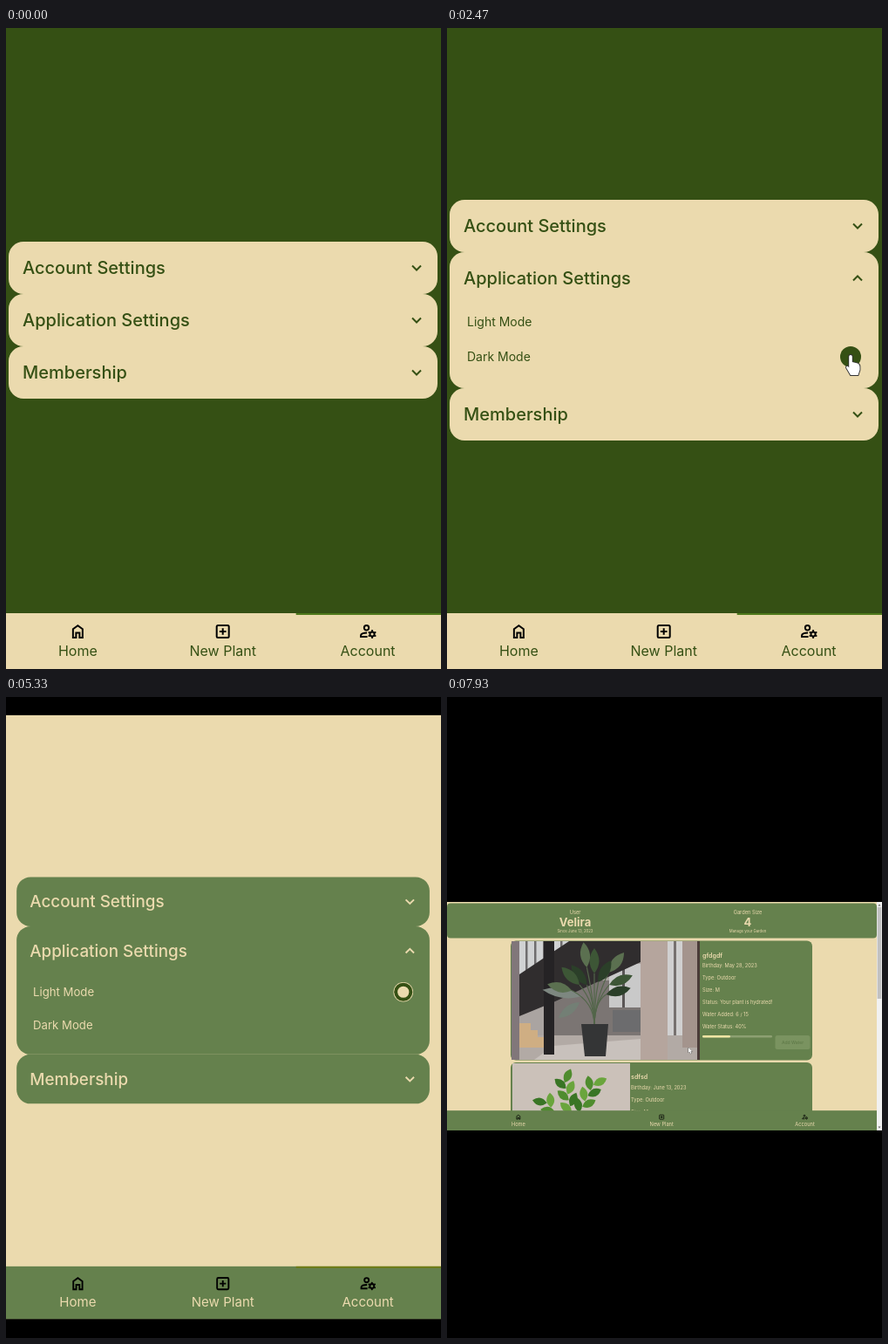
Recreate the animation shown at these times as an HTML page with a canvas. Size 499 by 735 pixels, loop 8000 ms.

```html
<!DOCTYPE html>
<html lang="en">
<head>
<meta charset="utf-8">
<title>Plant care app</title>
<style>
html, body { margin: 0; width: 100%; height: 100%; overflow: hidden; background: #000; }
canvas { display: block; width: 499px; height: 735px; }
</style>
</head>
<body>
<canvas id="stage" width="499" height="735"></canvas>
<script>
const LOOP = 8000, STEP = 130, STAGE_W = 499, STAGE_H = 735, WIDE = 1400;
const BEIGE = '#ebdaae', DARK = '#355014', GREEN = '#65814d';
const themes = {
  dark: { page: DARK, card: BEIGE, ink: DARK, line: '#4f7a1c' },
  light: { page: BEIGE, card: GREEN, ink: BEIGE, line: '#6f7a12' }
};
const SWITCH_DARK = 2470, SWITCH_LIGHT = 4160, HOME_AT = 6890, PHOTOS_AT = 7540;

const ctx = document.getElementById('stage').getContext('2d');

const clamp = v => Math.max(0, Math.min(1, v));
const easeOut = v => 1 - (1 - v) ** 2;
const easeInOut = v => v < .5 ? 2 * v * v : 1 - 2 * (1 - v) ** 2;
const mix = (a, b, k) => a + (b - a) * k;
const tween = (t, start, span) => easeOut(clamp((t - start) / span));

function rect(x, y, w, h, color) {
  ctx.fillStyle = color;
  ctx.fillRect(x, y, w, h);
}

function box(x, y, w, h, r, color) {
  ctx.beginPath();
  ctx.roundRect(x, y, w, h, r);
  ctx.fillStyle = color;
  ctx.fill();
}

function disc(x, y, r, color) {
  ctx.beginPath();
  ctx.arc(x, y, r, 0, Math.PI * 2);
  ctx.fillStyle = color;
  ctx.fill();
}

function poly(color, ...p) {
  ctx.beginPath();
  for (let i = 0; i < p.length; i += 2) ctx.lineTo(p[i], p[i + 1]);
  ctx.fillStyle = color;
  ctx.fill();
}

function text(str, x, y, size, weight, color, align = 'left') {
  ctx.font = `${weight} ${size}px Inter, sans-serif`;
  ctx.textAlign = align;
  ctx.fillStyle = color;
  ctx.fillText(str, x, y);
}

function at(x, y, draw) {
  ctx.save();
  ctx.translate(x, y);
  draw();
  ctx.restore();
}

// Navigation bar

const housePath = new Path2D('M-5.5 7V-2.8L0-6.8 5.5-2.8V7H2V1.5H-2V7Z');
const plusPath = new Path2D('M-3.8 0H3.8M0-3.8V3.8');
const personPath = new Path2D('M-.5 6H-8V4.2Q-7.4 1.4-1 1.4M1.2-4.2a2.7 2.7 0 1 1-5.4 0a2.7 2.7 0 1 1 5.4 0');

const icons = [
  () => ctx.stroke(housePath),
  () => {
    ctx.beginPath();
    ctx.roundRect(-7, -7, 14, 14, 1.5);
    ctx.stroke();
    ctx.stroke(plusPath);
  },
  () => {
    ctx.stroke(personPath);
    ctx.beginPath();
    ctx.arc(5, 3, 2.6, 0, Math.PI * 2);
    ctx.stroke();
    for (let i = 0; i < 6; i++) {
      const a = i * Math.PI / 3 + Math.PI / 6;
      disc(5 + 4 * Math.cos(a), 3 + 4 * Math.sin(a), 1.1, '#000');
    }
  }
];

function drawNav(width, theme, active) {
  rect(0, 671, width, 64, theme.card);
  if (active >= 0) rect(width * active / 3, 671, width / 3, 2, theme.line);
  ['Home', 'New Plant', 'Account'].forEach((label, i) => {
    const x = width * (i + .5) / 3 - .8;
    ctx.strokeStyle = '#000';
    ctx.lineWidth = 2;
    at(x, 692, icons[i]);
    text(label, x, 720, 16, 400, theme.ink, 'center');
  });
}

// Account page

function drawChevron(x, y, open, color) {
  at(x, y + 5 * Math.sin(Math.PI * open), () => {
    ctx.rotate(Math.PI * open);
    ctx.beginPath();
    ctx.moveTo(-5, -2.5);
    ctx.lineTo(0, 2.5);
    ctx.lineTo(5, -2.5);
    ctx.strokeStyle = color;
    ctx.lineWidth = 2;
    ctx.stroke();
  });
}

function drawRadio(x, y, light) {
  if (!light) return disc(x, y, 12, DARK);
  disc(x, y, 12, BEIGE);
  disc(x, y, 11.2, DARK);
  disc(x, y, 7, BEIGE);
}

function drawAccount(t, width) {
  const light = t >= SWITCH_LIGHT;
  const theme = light ? themes.light : themes.dark;
  const w = Math.min(width - 7, 503), x = (width - w) / 2 - .5;
  const appOpen = tween(t, 1424, 240);
  const panels = [
    ['Account Settings', 112 * (tween(t, 640, 210) - tween(t, 1424, 210)),
      tween(t, 640, 280) - tween(t, 1424, 280)],
    ['Application Settings', 96 * appOpen, tween(t, 1424, 280)],
    ['Membership', 0, 0]
  ];
  let y = 335 - panels.reduce((sum, p) => sum + 60 + p[1], 0) / 2;

  rect(0, 0, width, STAGE_H, theme.page);
  panels.forEach(([title, extra, turn], i) => {
    const h = 60 + extra;
    ctx.save();
    box(x, y, w, h, 17, theme.card);
    ctx.clip();
    text(title, x + 16, y + 37, 20, 500, theme.ink);
    drawChevron(x + w - 24, y + 30, turn, theme.ink);
    if (i === 1 && extra > 0) {
      const row = y + 80 + 53 * (1 - appOpen);
      const picked = t >= SWITCH_DARK && !light ? 1 : 0;
      text('Light Mode', x + 20, row + 5, 14, 400, theme.ink);
      text('Dark Mode', x + 20, row + 45, 14, 400, theme.ink);
      drawRadio(x + w - 32, row + 40 * picked, light);
    }
    ctx.restore();
    y += h;
  });
  drawNav(width, theme, 2);
}

// Home page, laid out in stage pixels

function leaf(x, y, len, angle, w, color) {
  at(x, y, () => {
    ctx.rotate(angle);
    ctx.beginPath();
    ctx.moveTo(0, 0);
    ctx.quadraticCurveTo(len * .5, -w, len, 0);
    ctx.quadraticCurveTo(len * .5, w, 0, 0);
    ctx.fillStyle = color;
    ctx.fill();
  });
}

function drawLoft() {
  ctx.save();
  ctx.beginPath();
  ctx.rect(74, 280, 216, 136);
  ctx.clip();
  rect(74, 280, 216, 136, '#aaa4a1');
  rect(83, 280, 60, 50, '#d0d2d3');
  for (let x = 90; x < 145; x += 10) rect(x, 280, 2.5, 50, '#6f6d6e');
  rect(122, 325, 100, 66, '#7b7573');
  rect(186, 306, 36, 50, '#c9c9c9');
  rect(201, 306, 3, 50, '#5a5656');
  poly('#302d2e', 83, 318, 140, 280, 222, 280, 222, 304, 122, 350, 83, 366);
  rect(74, 388, 216, 28, '#b2aaa5');
  poly('#c8c1bc', 122, 400, 222, 392, 222, 416, 100, 416);
  poly('#cfae83', 83, 374, 96, 374, 96, 382, 104, 382, 104, 390, 111, 390, 111, 402, 83, 402);
  rect(190, 359, 32, 25, '#6c6c6e');
  rect(74, 280, 9, 136, '#81777a');
  rect(111, 280, 12, 130, '#252325');
  rect(222, 280, 31, 136, '#b5a59d');
  rect(253, 280, 17, 108, '#d0d0d0');
  rect(260, 280, 3, 108, '#77716f');
  rect(270, 280, 17, 122, '#a4948d');
  rect(287, 280, 3, 136, '#4a3b38');
  leaf(155, 343, 46, 3.3, 11, '#7d8780');
  leaf(152, 350, 30, 2.5, 10, '#737f75');
  for (let i = 0; i < 9; i++) {
    const a = -Math.PI * (.08 + .84 * i / 8);
    const reach = 20 + 9 * (i % 3);
    const x = 169 + reach * .7 * Math.cos(a), y = 346 + reach * Math.sin(a);
    ctx.beginPath();
    ctx.moveTo(169, 377);
    ctx.quadraticCurveTo(169, 350, x, y);
    ctx.strokeStyle = '#53664a';
    ctx.lineWidth = 1.2;
    ctx.stroke();
    leaf(x, y, 29, a + .2 * (i % 2), 11, ['#2b3f29', '#3d5636', '#5b7050'][i % 3]);
  }
  poly('#343536', 154, 375, 185, 375, 182, 412, 158, 412);
  ctx.restore();
}

function drawSprout() {
  ctx.save();
  ctx.beginPath();
  ctx.rect(75, 420, 135, 55);
  ctx.clip();
  rect(75, 420, 135, 55, '#cbc1b9');
  [[124, -2.3, 3], [143, -1.8, 6], [152, -1.1, 6]].forEach(([x, lean, pairs], i) => {
    for (let k = 0; k < pairs; k++) {
      const up = k * 7, side = k % 2 ? 1 : -1;
      leaf(x + Math.cos(lean) * up, 476 + Math.sin(lean) * up, 17,
        lean + side * .65, 9, ['#4f8c2e', '#6aa53c', '#397525'][(k + i) % 3]);
    }
  });
  ctx.restore();
}

function drawFacts(x, y, gap, title, facts) {
  text(title, x, y + 2.5, 7.1, 600, BEIGE);
  facts.forEach((fact, i) => text(fact, x, y + 14 + gap * i, 5.7, 400, BEIGE));
}

const firstFacts = ['Birthday: May 28, 2023', 'Type: Outdoor', 'Size: M',
  'Status: Your plant is hydrated!', 'Water Added: 6 / 15', 'Water Status: 40%'];
const secondFacts = ['Birthday: June 13, 2023', 'Type: Outdoor', 'Size: M',
  'Status: Your plant is hydrated!'];

function drawWater(x, y) {
  box(x, y, 80, 2.6, 1.3, '#8da072');
  box(x, y, 32, 2.6, 1.3, '#f0e5a4');
  box(x + 83.5, y, 40, 16, 2.5, '#7a9360');
  text('Add Water', x + 103.5, y + 10, 5, 500, '#5f7a48', 'center');
}

function drawHome(photos) {
  const lift = photos ? 1 : 0;
  rect(0, 235, STAGE_W, 262, BEIGE);
  box(0, 237.5 - lift, 493, 40, 4, GREEN);
  [[147, 'User', 'Velira', 'Since June 13, 2023'],
   [345, 'Garden Size', '4', 'Manage your Garden']].forEach(([x, top, big, low]) => {
    text(top, x, 250 - lift, 5.7, 400, BEIGE, 'center');
    text(big, x, 264 - lift, 13, 700, BEIGE, 'center');
    text(low, x, 270.7 - lift, 4.28, 400, BEIGE, 'center');
  });
  if (photos) {
    box(73, 279.5, 346, 137, 6, GREEN);
    drawLoft();
    drawFacts(293, 296, 14, 'gfdgdf', firstFacts);
    drawWater(293, 388);
    box(73, 419, 346, 70, 6, GREEN);
    drawSprout();
    drawFacts(211, 435.5, 14, 'sdfsd', secondFacts);
  } else {
    box(183, 281, 126.5, 121, 5, GREEN);
    drawFacts(184, 297, 11.5, 'gfdgdf', firstFacts);
    drawWater(184, 373.3);
    box(183, 404.5, 126.5, 90, 5, GREEN);
    drawFacts(184, 421, 11.5, 'sdfsd', secondFacts);
  }
  const thumbEnd = photos ? 346 : 357;
  rect(493, 235, 6, 262, '#f1f1f1');
  rect(493.7, 241, 4.6, thumbEnd - 241, '#c1c1c1');
  poly('#666', 494.5, 239.5, 496, 237.5, 497.5, 239.5);
  poly('#666', 494.5, 492.5, 496, 494.5, 497.5, 492.5);
}

// Pointer: time, x, y

const track = [
  [0, 515, 300], [130, 490, 290], [260, 455, 278], [850, 455, 278], [1170, 449, 381],
  [1560, 449, 381], [2210, 463, 375], [2500, 463, 375], [2860, 470, 398], [3120, 470, 398],
  [3640, 489, 339], [3900, 463, 338], [4160, 463, 338], [4810, 515, 345], [5720, 515, 345],
  [5850, 350, 393], [6110, 179, 486.5], [6630, 82, 487], [6890, 82, 487],
  [7280, 211, 464], [7930, 277, 402], [8000, 277, 402]
];
const handTimes = [[260, 2870], [3890, 4300], [6110, 7000]];
const handPath = new Path2D('M-1.8 1.8a1.8 1.8 0 0 1 3.6 0V8L8 9.5q2.5.8 2.5 4V17L8.5 23H0L-5 14.5q0-2.5 2-1.5L-1.8 14.5Z');
const arrowPath = new Path2D('M0 0V16.5L4 13 7 19.5 9.7 18.3 6.8 12H12Z');

function drawPointer(t, scale) {
  const i = track.findIndex(k => k[0] > t);
  const [t0, x0, y0] = track[i - 1], [t1, x1, y1] = track[i];
  const k = (t - t0) / (t1 - t0);
  const path = handTimes.some(([a, b]) => t >= a && t < b) ? handPath : arrowPath;
  at(mix(x0, x1, k), mix(y0, y1, k), () => {
    ctx.scale(scale, scale);
    ctx.strokeStyle = '#333';
    ctx.lineWidth = 1.8;
    ctx.stroke(path);
    ctx.fillStyle = '#fff';
    ctx.fill(path);
  });
}

function draw(t) {
  // The window widens while its picture keeps fitting the stage width.
  const width = mix(STAGE_W, WIDE, easeInOut(clamp((t - 5245) / 650)));
  const scale = STAGE_W / width;
  const top = Math.max(0, 365.4 - 365.8 * scale);
  const home = t >= HOME_AT;

  rect(0, 0, STAGE_W, STAGE_H, '#000');
  if (home) drawHome(t >= PHOTOS_AT);
  at(0, top, () => {
    ctx.scale(scale, scale);
    if (home) drawNav(493 / scale, themes.light, -1);
    else drawAccount(t, width);
  });
  drawPointer(t, scale);
}

function tick() {
  const t = performance.now() % LOOP;
  draw(Math.floor(t / STEP) * STEP);
  requestAnimationFrame(tick);
}
tick();
</script>
</body>
</html>
```
